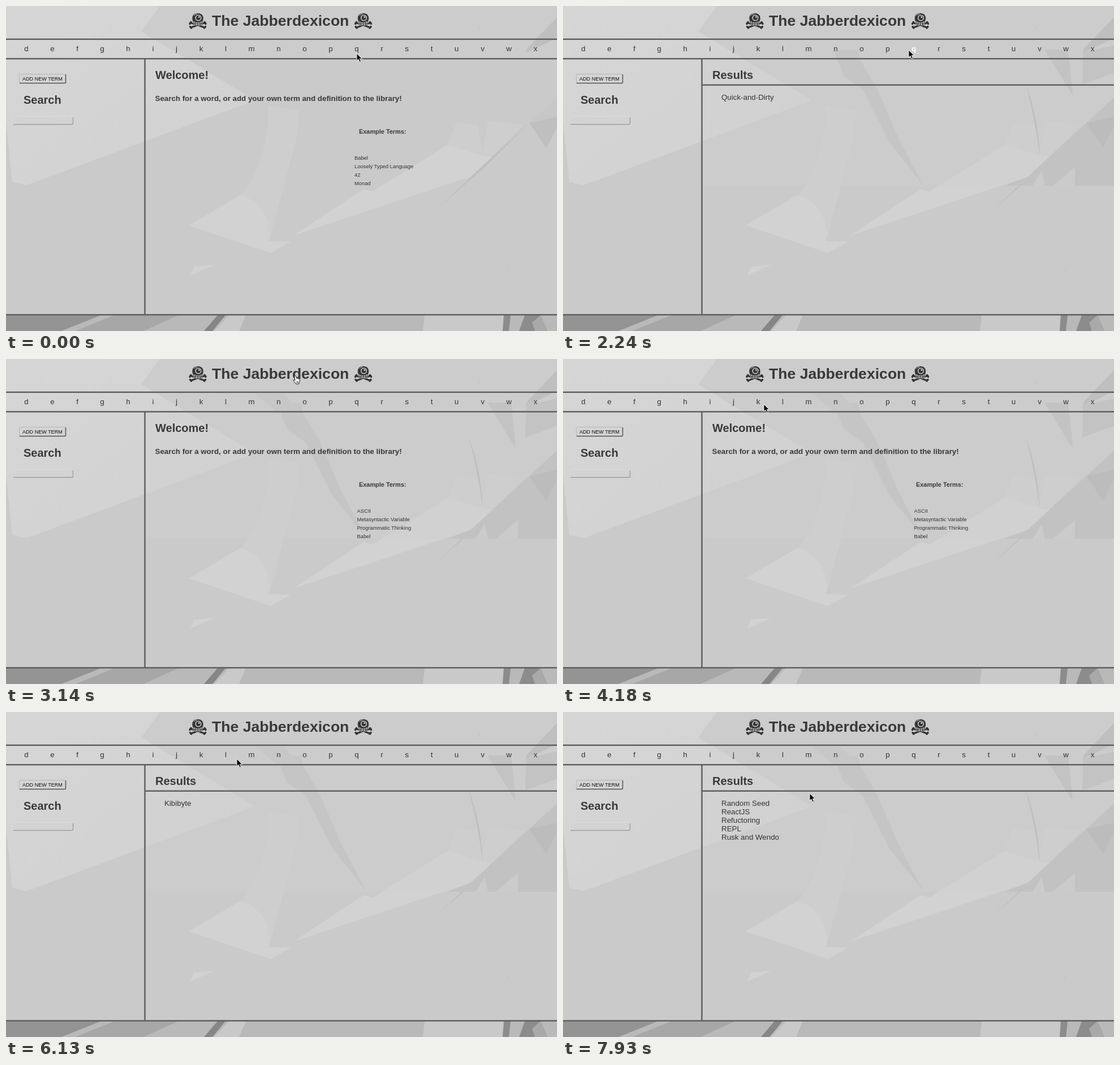
An HTML page that plays this animation: 974x575 px, repeating every 8 s.

```html
<!DOCTYPE html>
<html lang="en">
<head>
<meta charset="utf-8">
<title>The Jabberdexicon</title>
<style>
html, body { margin: 0; width: 100%; height: 100%; overflow: hidden; background: #c9cac9; }
svg { display: block; width: 974px; height: 575px; }
text { font-family: "Liberation Sans", Arial, sans-serif; fill: #333; white-space: pre; }
.b { font-weight: 700; fill: #393939; }
.mid { text-anchor: middle; }
.lit { font-weight: 700; fill: #fff; }
</style>
</head>
<body>
<svg viewBox="0 0 974 575">
  <defs>
    <linearGradient id="pane" x2="1" y2="1">
      <stop stop-color="#d5d6d5"/><stop offset="1" stop-color="#d0d1d0"/>
    </linearGradient>
    <g id="badge">
      <g fill="none" stroke="#333" stroke-width="3" stroke-linecap="round">
        <path d="M3 17.5L28 26M29 17.5L4 26"/>
        <path d="M2 19.5l2-3M2.500 24.500l2 2.500M30 19.500l-2-3M29.500 24.500l-2 2.500" stroke-width="3.400"/>
      </g>
      <path d="M16 .5C8 .5 5.500 6 6 11c.3 3 2 5 2 8 2 3 5 4.500 8 4.500s6-1.500 8-4.500c0-3 1.700-5 2-8C26.500 6 24 .5 16 .5Z" fill="#353535" stroke="#cdcecd" stroke-width=".7"/>
      <path d="M9 5Q11.500 2 15 2" fill="none" stroke="#cdcecd"/>
      <circle cx="17" cy="9" r="5.600" fill="#cdcecd"/>
      <circle cx="17" cy="9" r="4" fill="#333"/>
      <circle cx="18.300" cy="7.600" r="1.500" fill="#cdcecd"/>
      <path d="M8.500 15q7.500 4.500 15 0-.5 4.500-3 6-4.500 1.500-9 0-2.500-1.500-3-6Z" fill="#cdcecd"/>
      <path d="M9 18q7 3 14 0M12 16.500v4.500M16 17v5M20 16.500v4.500" fill="none" stroke="#333"/>
    </g>
  </defs>

  <rect width="974" height="575" fill="#c9cac9"/>
  <rect width="974" height="93" fill="#cbcccb"/>
  <g id="backdrop">
    <path fill="url(#pane)" d="M0 0H272L239 45 440 167 36 317 11 311 0 203Z"/>
    <path fill="#cdcecd" d="M463 176L517 184Q518 215 512 240L465 416Q468 355 416 334 444 300 457 245 466 210 463 176Z"/>
    <path fill="#d1d2d1" d="M323 388L415 334Q461 349 467 402L464 416 504 417 468 437Z"/>
    <path fill="#d1d2d1" d="M325 477L333 461 369 458Z"/>
    <path fill="#c6c7c6" d="M974 162V207L955 251 925 207 822 302Z"/>
    <path fill="#cdcecd" d="M780 246L797 205 835 211 842 264ZM842 264L852 203 915 210 862 264Z"/>
    <path fill="#d1d2d1" d="M508 406L632 324 648 328 780 246 842 264 861 266 822 302Z"/>
    <path fill="#bebfbe" d="M759 362L822 302 925 206 850 282ZM974 20L921 75 919 83 974 57Z"/>
    <path fill="#bfbfc0" d="M925 207L974 196V215L955 251Z"/>
    <path fill="#c2c3c2" d="M834 36L840 43 838 44ZM885 468h3v4Z"/>
  </g>
  <g id="shade">
    <path fill="#cdcecd" opacity=".35" d="M247 95H974V318H247Z"/>
    <path fill="#c4c5c4" d="M478 78H521L525 95 556 148 592 232 637 317 576 240 530 148 497 125 485 95Z"/>
    <path fill="#c2c3c2" d="M851 77H893L901 158ZM919 82L974 70V118L918 139Z"/>
    <path fill="#bebfbe" d="M817 135Q841 200 842 263 836 205 817 135Z"/>
    <path fill="#c1c2c1" d="M974 162V318H780L822 302 925 207Z"/>
    <path fill="#bbbcbb" d="M925 207L974 196V212L955 251Z"/>
    <path fill="#cacbca" d="M830 318L846 292 852 318ZM866 318L905 285V318Z"/>
  </g>
  <path id="trail" fill="#c6c7c6" d="M440 61H490L521 92H478Z"/>

  <g id="footer">
    <path fill="#b8b9b8" d="M0 547H974V575H0Z"/>
    <path fill="#949494" d="M0 547H168L98 575H0Z"/>
    <path fill="#a7a7a7" d="M192 547H305L243 575H122Z"/>
    <path fill="#858685" d="M374 547H388L365 575H350Z"/>
    <path fill="#c8c9c8" d="M394 547H424L412 575H368ZM740 547H880L878 575H737Z"/>
    <path fill="#8b8c8b" d="M880 547H892L889 575H878ZM917 547H945L957 575H907Z"/>
    <path fill="#a8a9a8" d="M930 560L945 547 957 575H935Z"/>
  </g>

  <path d="M0 58.800H974M0 93.200H974M0 546.200H974M245.500 93V546" fill="none" stroke="#5f605f" stroke-width="2.500"/>
  <use href="#badge" x="323" y="12"/>
  <use href="#badge" x="615.500" y="12"/>
  <text class="b" x="364" y="35" font-size="26.600">The Jabberdexicon</text>
  <g id="nav" class="mid" font-size="13.330"></g>

  <g id="side">
    <rect x="23.500" y="120.500" width="82" height="16" rx="2" fill="#d3d4d3" stroke="#b5b6b5"/>
    <path d="M24 136.500H104Q105.500 136.500 105.500 135V121" fill="none" stroke="#505150" stroke-width="1.500"/>
    <text x="29" y="132" font-size="9.070" style="fill:#111">ADD NEW TERM</text>
    <text class="b" x="31" y="173" font-size="20">Search</text>
    <rect x="11.500" y="195.500" width="107" height="14" rx="3" fill="#d2d3d2" stroke="#dadbda"/>
    <path d="M13 209.500H116Q118.500 209.500 118.500 207V197" fill="none" stroke="#9d9e9d" stroke-width="1.400"/>
  </g>

  <g id="welcome">
    <text class="b" x="264" y="129" font-size="20">Welcome!</text>
    <text class="b" x="263.500" y="168.300" font-size="13.330">Search for a word, or add your own term and definition to the library!</text>
    <text class="b" x="624" y="226" font-size="10.920">Example Terms:</text>
    <g id="terms" font-size="9.330"></g>
  </g>
  <g id="results">
    <path d="M246 139.800H974" stroke="#5f605f" stroke-width="2.500"/>
    <text class="b" x="264" y="129" font-size="20">Results</text>
    <g id="hits" font-size="13.330"></g>
  </g>

  <path id="arrow" d="M0 0V13L3 10.300 5.200 15.200 7.500 14.200 5.400 9.400H9.500Z" fill="#000" stroke="#fff" stroke-width=".9"/>
  <path id="hand" d="M3 1.200Q4.300 0 5.300 1.500L6.300 5.200Q8 4.400 8.600 5.700 10 5.200 10.500 6.500 12 6.300 12 8.200 12 10.800 10.500 12.500V15H5.200L2.600 11.800.5 9Q.2 7.600 2 7.800L3.500 9 2.400 2.500ZM6.600 10.500v2.500M8.400 10.500v2.500" fill="#fff" stroke="#111" stroke-width="1" stroke-linejoin="round"/>
</svg>
<script>
const LOOP = 8000;
const $ = id => document.getElementById(id);
const show = (node, on) => node.setAttribute('display', on ? 'inline' : 'none');

function addText(parent, str, x, y) {
  const node = document.createElementNS('http://www.w3.org/2000/svg', 'text');
  node.setAttribute('x', x);
  node.setAttribute('y', y);
  node.textContent = str;
  parent.append(node);
  return node;
}

const navX = [36, 82, 126, 170, 216, 260, 301.5, 345, 388.5, 434, 482,
  528, 574, 620, 664.5, 708.5, 752.5, 796.5, 842.5, 889, 936];
const letters = {};
[...'defghijklmnopqrstuvwx'].forEach((c, i) => {
  letters[c] = addText($('nav'), c, navX[i], 80);
});

// Page contents by start time
const pages = [
  { t: 0, x: 616, terms: ['Babel', 'Loosely Typed Language', '42', 'Monad'] },
  { t: 1190, hits: [] },
  { t: 1340, hits: ['Quick-and-Dirty'] },
  { t: 3140, x: 620.5, terms: ['ASCII', 'Metasyntactic Variable', 'Programmatic Thinking', 'Babel'] },
  { t: 4930, hits: [] },
  { t: 5230, hits: ['Kibibyte'] },
  { t: 7330, hits: ['Random Seed', 'ReactJS', 'Refuctoring', 'REPL', 'Rusk and Wendo'] }
];

// Pointer samples: time, x, y, shape, highlighted letter
const pointer = [
  [0, 620, 84, 'arrow'],
  [740, 617, 81, 'hand'],
  [890, 617, 81, 'hand', 'q'],
  [2240, 611, 78, 'arrow', 'q'],
  [2390, 582, 66, 'arrow'],
  [2540, 548, 48, 'arrow'],
  [2690, 518, 34, 'hand'],
  [2840, 507.5, 29, 'hand'],
  [3590, 496, 37, 'hand'],
  [3740, 458, 60, 'arrow'],
  [3890, 405, 74, 'arrow'],
  [4040, 355, 80, 'arrow'],
  [4190, 329, 80, 'arrow'],
  [4330, 334, 79, 'arrow'],
  [4480, 337, 78, 'hand', 'k'],
  [5980, 356, 81, 'arrow'],
  [6130, 408, 83, 'arrow'],
  [6280, 490, 84, 'arrow'],
  [6430, 574, 83, 'arrow'],
  [6580, 640, 81, 'arrow'],
  [6730, 670, 79, 'arrow'],
  [6880, 661, 76, 'hand'],
  [7030, 661, 76, 'hand', 'r'],
  [7780, 566, 112, 'arrow'],
  [7930, 436, 144, 'arrow']
];

const latest = (list, t, time) => list.filter(item => time(item) <= t).pop();
let page;

function setPage(next) {
  if (next === page) return;
  page = next;
  show($('welcome'), page.terms);
  show($('results'), page.hits);
  $('terms').replaceChildren();
  $('hits').replaceChildren();
  (page.terms || []).forEach((s, i) => addText($('terms'), s, page.x, 272 + i * 15));
  (page.hits || []).forEach((s, i) => addText($('hits'), s, 280, 166 + i * 15));
}

function render(t) {
  setPage(latest(pages, t, p => p.t));
  show($('shade'), t >= 1190);
  show($('trail'), t >= 2840);
  const [, x, y, shape, lit] = latest(pointer, t, p => p[0]);
  for (const id of ['arrow', 'hand']) {
    show($(id), id === shape);
    $(id).setAttribute('transform', `translate(${x} ${y})`);
  }
  for (const c in letters) letters[c].setAttribute('class', c === lit ? 'lit' : '');
}

const start = performance.now();
function tick() {
  render((performance.now() - start) % LOOP);
  requestAnimationFrame(tick);
}
tick();
</script>
</body>
</html>
```
